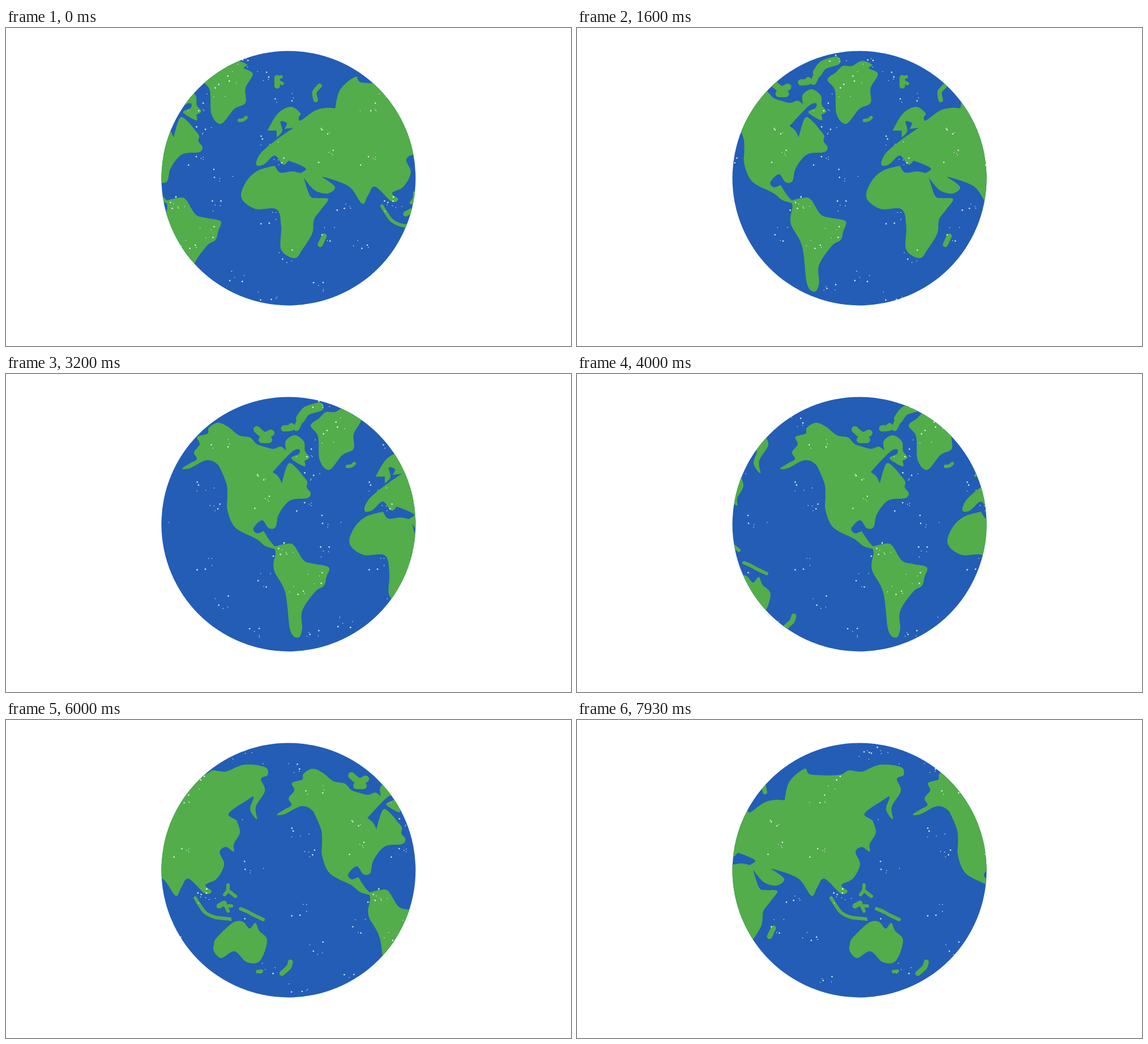
An HTML page for the animation above (8 s loop, 998 by 561 pixels).

```html
<!DOCTYPE html>
<html lang="en">
<head>
<meta charset="utf-8">
<title>Turning globe</title>
<style>
  html, body { margin: 0; width: 100%; height: 100%; overflow: hidden; background: #fff; }
  svg { display: block; width: 100vw; height: 100vh; }
</style>
</head>
<body>
<svg viewBox="0 0 998 561">
  <defs>
    <clipPath id="disc"><circle cx="499" cy="264.9" r="224.5"/></clipPath>
  </defs>
  <circle cx="499" cy="264.9" r="224.5" fill="#235db6"/>
  <g clip-path="url(#disc)">
    <g id="world">
      <g id="map">
        <g id="land" fill="#52ad4a" stroke="#52ad4a" stroke-width="0" stroke-linecap="round"/>
        <g id="specks" fill="#fff"/>
      </g>
      <use href="#map" x="-688"/>
      <use href="#map" x="688"/>
    </g>
  </g>
</svg>
<script>
const WIDTH = 688, STEPS_PER_TURN = 144;
const LOOP = 8000, TICK = 1000 / 30, TICKS_PER_STEP = 2.4;
const $ = id => document.getElementById(id);

function add(parent, tag, attrs) {
  const el = document.createElementNS('http://www.w3.org/2000/svg', tag);
  for (const key in attrs) el.setAttribute(key, attrs[key]);
  parent.append(el);
}

function points(text) {
  return text.trim().split(/\s+/).map(t => {
    const [x, y] = t.replace('!', '').split(',').map(Number);
    return { x, y, sharp: t.endsWith('!') };
  });
}

// Smooth curve through the points; a trailing "!" makes a sharp corner.
function curve(text, closed) {
  const pts = points(text), n = pts.length;
  const at = i => closed ? pts[(i + n) % n] : pts[Math.max(0, Math.min(n - 1, i))];
  const handle = (i, dir) => {
    const p = at(i), k = p.sharp ? 0 : dir / 6;
    return `${p.x + (at(i + 1).x - at(i - 1).x) * k} ${p.y + (at(i + 1).y - at(i - 1).y) * k}`;
  };
  let d = `M${pts[0].x} ${pts[0].y}`;
  for (let i = 0; i < (closed ? n : n - 1); i++) {
    d += `C${handle(i, 1)} ${handle(i + 1, -1)} ${at(i + 1).x} ${at(i + 1).y}`;
  }
  return closed ? d + 'Z' : d;
}

const shape = (shift, text) =>
  add($('land'), 'path', { d: curve(text, true), transform: `translate(${shift})` });

// Narrow islands are round-ended strokes.
const island = (shift, width, ...lines) => lines.forEach(line =>
  add($('land'), 'path', {
    d: curve(line, false), fill: 'none', 'stroke-width': width, transform: `translate(${shift})`
  }));

// Greenland and Iceland
shape(-96, `443,91 458,78 470,67 486,67 504,58 522,65 516,71 532,81 519,106 519,132 499,143
  476,169 459,152 456,110`);
island(-96, 6, '508,163 515,162 520,158');

// Arctic islands
island(-96, 16, '458,58 436,65 425,79');
island(-96, 11, '425,80 418,95', '409,92 408,95 396,96');
island(-239, 12, '491,98 504,108 516,104', '500,116 512,116', '506,108 506,115');

// North America
shape(-239, `519,173! 540,150 556,135 566,133 565,141 552,149 575,163 575,153! 584,147 576,136
  574,119 558,108 542,118 543,135! 533,128 520,132 503,128 490,123 479,112 459,108 440,93 422,86
  406,95 404,105 386,111 390,124 380,138 385,150 372,158 359,167 373,166 403,152 424,162 437,192!`);
shape(-239, `424,162! 437,192 439,215 439,240 453,271 490,291 507,304 530,310! 517,298 503,277!
  491,281 485,272 500,258 512,272 524,270 530,247 550,223 580,219 586,210 579,200 580,190 571,178
  562,167 549,157 542,168 535,193! 529,181 519,173! 500,150! 440,150!`);

// South America
shape(-239, `520,305! 541,300 556,302 574,329 593,335 618,341 614,358 609,374 594,384 571,418
  571,450 564,465 550,452 541,385 521,345 524,315`);

// Europe and Arabia
shape(0, `462,181! 480,151 503,139 520,150 517,158 521,163 545,146 565,141 582,142! 595,200!
  570,258! 558,263! 581,280 568,292 545,286 526,264! 520,256! 530,249 520,242 499,234! 492,241
  486,238 474,225 455,241 442,241 449,222 475,199 508,176! 492,178! 496,168 485,165 488,182
  478,193! 478,181!`);
island(0, 8, '554,102 545,113 547,127');
island(0, 10, '479,88 479,102');
island(0, 6, '480,88 486,86', '480,94 488,98');

// Africa
shape(0, `416,300 423,273 444,252 475,243! 484,255 505,253 520,256! 530,255! 530,264! 526,264!
  537,296 549,300 569,302 556,321 544,338 541,362 524,390 510,406 486,391 486,350 478,320 440,319`);
island(0, 9, '562,367 555,382');

// Asia
shape(215, `367,141! 375,109 402,86 413,96 462,97 480,89 503,91 535,79 572,83 577,97 565,104
  572,125 556,153 558,175 546,158 552,136 541,141 508,165 522,178 528,198! 500,220! 345,220!
  345,148!`);
shape(215, `522,178! 528,198 517,219 517,232 503,224 492,233 500,255 487,280 467,291 478,302
  466,306 437,280 424,296 414,310 390,279 343,262! 340,200! 400,180!`);

// Southeast Asia, Australia, New Zealand
island(215, 6, '449,314 457,327 467,340 484,348 510,351', '507,291 506,301 501,308',
  '507,301 520,311', '529,333 541,338 554,345 569,352', '500,322 507,337', '503,328 513,328',
  '559,444 566,443');
island(215, 9, '491,328 500,323', '617,427 614,436 602,447');
shape(215, `482,395 487,384 515,358 533,356 545,368 555,358 562,372 576,389 563,425 540,427
  518,408 495,420 482,408`);

// Loose clusters of specks, each cluster appearing twice around the globe.
let seed = 11;
const random = () => (seed = seed * 16807 % 2147483647) / 2147483647;
const CLUSTERS = `64,60 100,88 157,85 188,128 333,138 372,112 412,56 48,186 160,194 252,183
  260,225 336,234 80,262 178,238 294,318 0,306 372,312 163,338 50,357 265,363 322,383 190,404
  105,440 345,452 158,470 256,462`;
for (const c of points(CLUSTERS)) {
  for (let i = 0; i < 5; i++) {
    const x = c.x + (random() - .5) * 34, cy = c.y + (random() - .5) * 26;
    const r = i < 2 ? 1.3 : .8;
    for (const u of [x, x + 304]) {
      add($('specks'), 'circle', { cx: (u + WIDTH) % WIDTH, cy, r, opacity: .85 });
    }
  }
}

const start = performance.now();
function draw(now) {
  const t = Math.max(0, now - start) % LOOP;
  // Steps land on 30 Hz ticks; the small allowance absorbs timer rounding.
  const tick = Math.floor((t + 5) / TICK);
  const step = Math.min(99, Math.floor(tick / TICKS_PER_STEP + 1e-6));
  $('world').setAttribute('transform', `translate(${step * WIDTH / STEPS_PER_TURN})`);
  requestAnimationFrame(draw);
}
draw(start);
</script>
</body>
</html>
```
